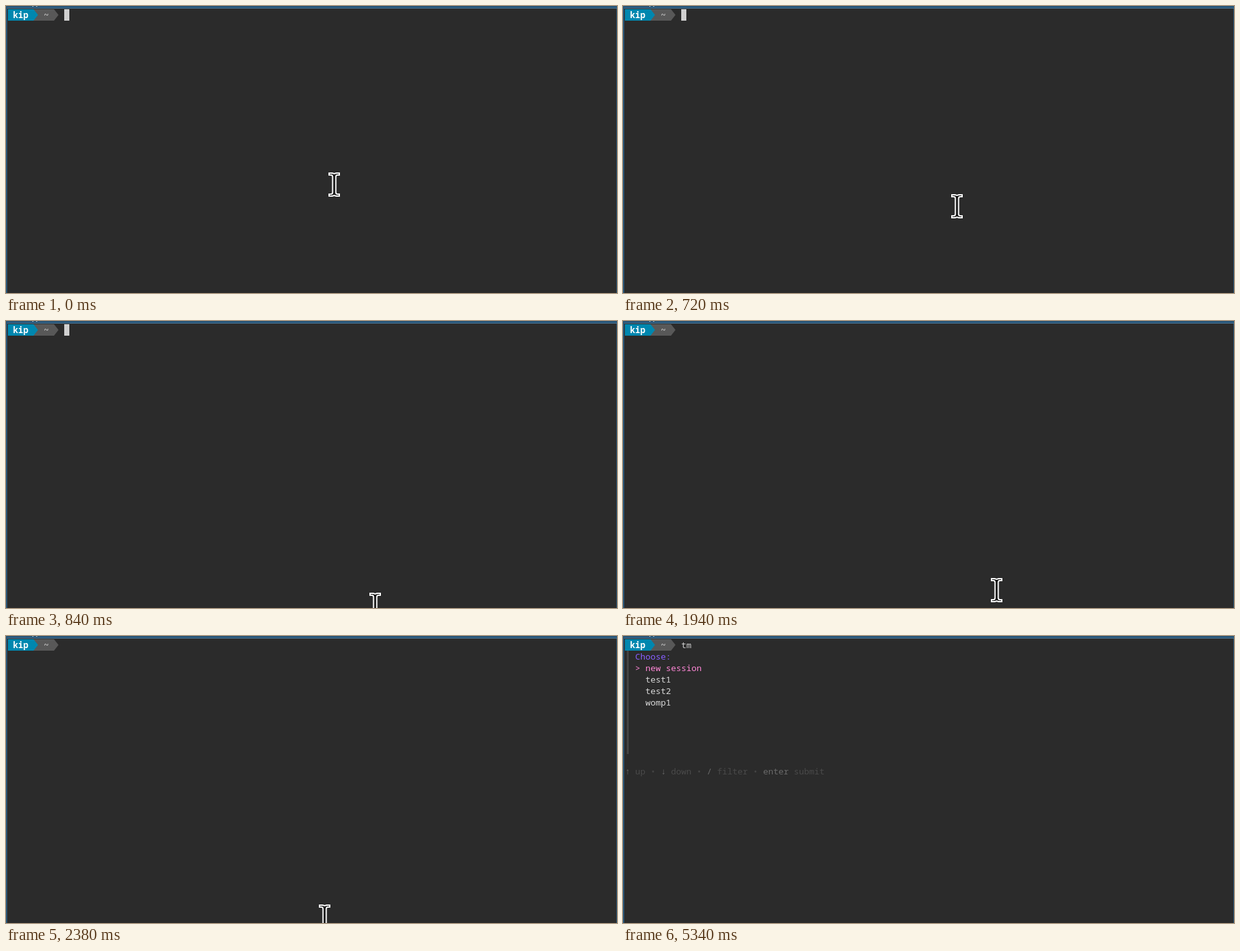
Animation of 955x450 px, one loop 8000 ms. Source, as an HTML page:

```html
<!DOCTYPE html>
<html lang="en">
<head>
<meta charset="utf-8">
<title>Terminal session picker</title>
<style>
  html, body { margin: 0; width: 100%; height: 100%; overflow: hidden; background: #2b2b2b; }
  svg { display: block; }
  text { font: 13.333px "Noto Sans Mono", "DejaVu Sans Mono", monospace; white-space: pre; }
</style>
</head>
<body>
<svg width="955" height="450" viewBox="0 0 955 450">
  <rect width="955" height="450" fill="#2b2b2b"/>
  <!-- window border and the lower edge of its title bar -->
  <path d="M0 0H955V3H2V450H0ZM954 3h1V450h-1Z" fill="#285577"/>
  <path d="M2 3H955V4H2Z" fill="#4c7899"/>
  <path d="M41 0h2v1h-2ZM47 0h2v1h-2Z" fill="#b4c4d0"/>
  <!-- prompt -->
  <path d="M43 5H75L82 14L75 23H43Z" fill="#585858"/>
  <path d="M3 5H43L50 14L43 23H3Z" fill="#0087af"/>
  <g id="prompt"></g>
  <g id="typed"></g>
  <g id="menu"><path d="M6 23h3V185h-3Z" fill="#444"/></g>
  <rect id="caret" y="5" width="8" height="18" fill="#d0d0d0"/>
  <path id="pointer" fill="#111" stroke="#fff" stroke-width="2" d="M-8 -18H-3L0 -17L3 -18H8V-15H5Q2.5 -15 2.5 -12V12Q2.5 15 5 15H8V18H3L0 17L-3 18H-8V15H-5Q-2.5 15 -2.5 12V-12Q-2.5 -15 -5 -15H-8Z"/>
</svg>
<script>
const CELL = 8, LINE = 18, LOOP = 8000;
const $ = id => document.getElementById(id);

function put(group, column, row, string, color, weight = 400) {
  const text = document.createElementNS("http://www.w3.org/2000/svg", "text");
  text.setAttribute("x", 3 + column * CELL);
  text.setAttribute("y", 19 + row * LINE);
  text.setAttribute("fill", color);
  text.style.fontWeight = weight;
  text.textContent = string;
  $(group).append(text);
}

put("prompt", 1, 0, "kip", "#fff", 700);
put("prompt", 7, 0, "~", "#bcbcbc", 700);
put("typed", 11, 0, "tm", "#d0d0d0");

put("menu", 2, 1, "Choose:", "#875fff");
put("menu", 2, 2, "> new session", "#ff87d7");
["test1", "test2", "womp1"].forEach((name, i) => put("menu", 4, 3 + i, name, "#d8d8d8"));

const help = [[0, "↑", "up"], [7, "↓", "down"], [16, "/", "filter"], [27, "enter", "submit"]];
for (const [column, key, action] of help) {
  if (column) put("menu", column - 2, 11, "•", "#444");
  put("menu", column, 11, key, "#6a6a6a");
  put("menu", column + key.length + 1, 11, action, "#4a4a4a");
}

// Pointer positions, each held until the next: time, x, y
const pointerStops = [
  [0, 513, 280], [680, 514, 289], [700, 522, 314], [740, 540, 362],
  [800, 565, 420], [840, 577, 445], [1660, 579, 430], [1700, 581, 431],
  [1940, 584, 422], [2380, 498, 440]
];

const show = (id, visible) => $(id).setAttribute("visibility", visible ? "visible" : "hidden");

function draw() {
  const time = performance.now() % LOOP;
  const typed = time >= 4080, listed = time >= 5340;
  const [, x, y] = pointerStops.findLast(stop => stop[0] <= time);
  $("pointer").setAttribute("transform", `translate(${x} ${y})`);
  $("caret").setAttribute("x", typed ? 107 : 91);
  show("pointer", !typed);
  show("typed", typed);
  show("menu", listed);
  show("caret", time < 1660 || typed && !listed);
  requestAnimationFrame(draw);
}
draw();
</script>
</body>
</html>
```
